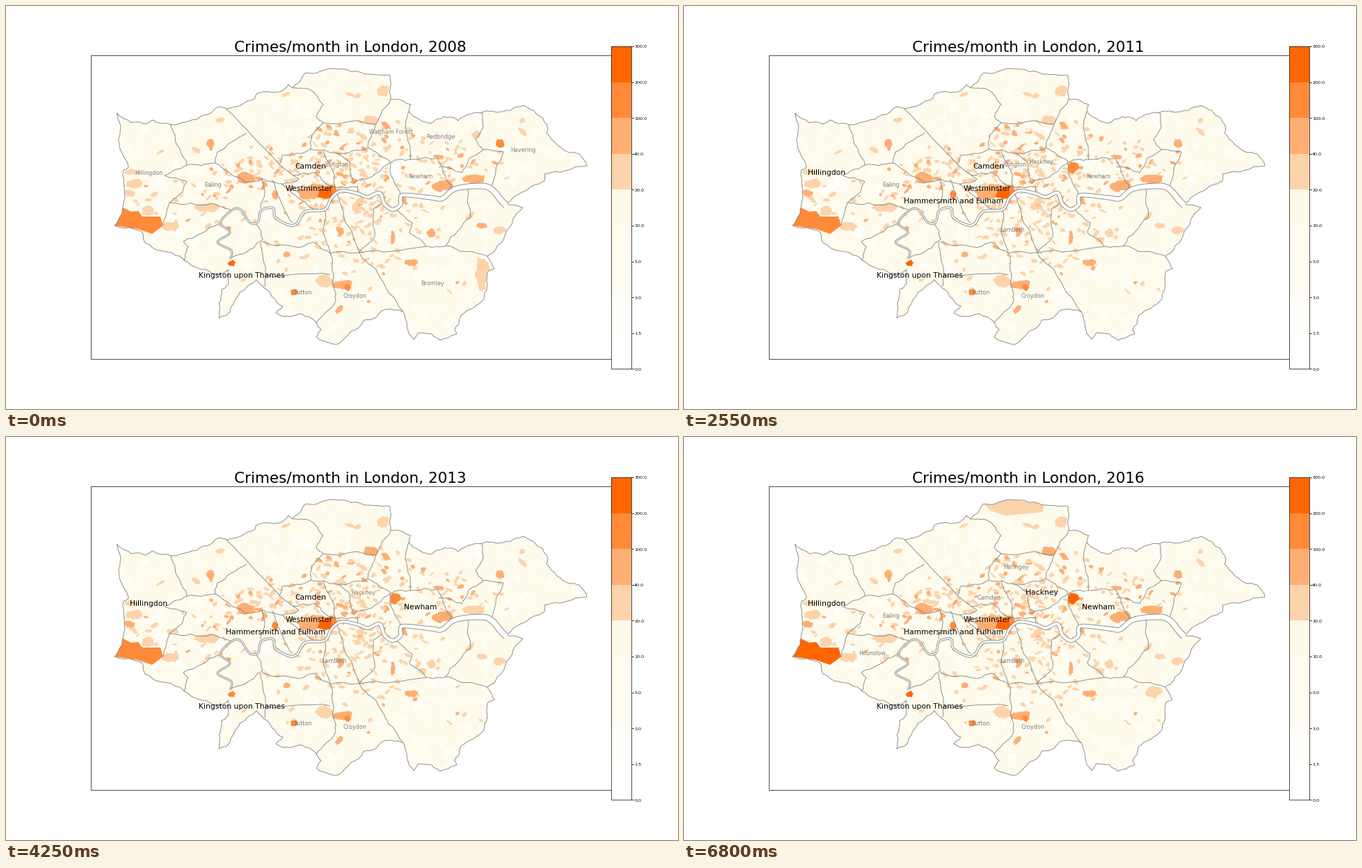
A matplotlib script that plays this animation: 966x580 px, repeating every 7.65 s.

```python
import numpy as np
import matplotlib.pyplot as plt
from matplotlib.animation import FuncAnimation
from matplotlib.collections import LineCollection, PolyCollection
from matplotlib.colors import to_rgba_array
from matplotlib.patches import Polygon, Rectangle

W, H, DPI = 966, 580, 64
PT = 72 / DPI
FIRST, COUNT = 2008, 9
GREY, DARK = "#808080", "#222222"
COLORS = ["#ffffff", "#fffefa", "#fffdf3", "#fffcef", "#fefaea",
          "#fdd3ab", "#feae73", "#ff8a39", "#ff6600"]
BOUNDS = [0, 1.5, 3, 5, 10, 20, 40, 100, 200, 300]
# white, peach, orange, red-orange, top class, pale
KEY = {"w": 0, "p": 5, "o": 6, "r": 7, "t": 8, "-": -1}
rng = np.random.default_rng(12)

NORTH_EDGE = [
    (160, 154), (180, 168), (200, 170), (210, 164), (237, 171), (262, 166),
    (306, 145), (317, 148), (358, 133), (360, 127), (390, 124), (406, 113),
    (412, 118), (431, 96), (470, 90), (522, 98), (552, 100), (553, 134),
    (582, 142), (579, 152), (608, 169), (630, 159), (650, 165), (676, 153),
    (706, 153), (743, 143), (772, 162)]
EAST_EDGE = [
    (779, 176), (777, 183), (800, 206), (824, 213), (835, 230), (774, 242),
    (774, 252), (745, 267), (718, 285), (743, 290), (728, 312), (699, 356),
    (692, 360), (702, 378), (693, 382), (691, 408), (687, 422), (654, 445),
    (645, 466), (648, 472), (624, 481), (612, 472), (593, 470), (586, 480)]
SOUTH_EDGE = [
    (571, 440), (544, 437), (532, 448), (514, 452), (502, 466), (475, 487),
    (446, 476), (453, 466), (446, 456), (424, 443), (396, 446), (388, 441),
    (398, 432), (376, 409), (360, 394), (336, 412), (322, 440), (306, 449),
    (310, 408), (320, 400), (320, 379), (306, 387), (286, 379), (256, 366)]
WEST_EDGE = [(250, 360), (200, 341), (196, 326), (156, 316), (168, 290),
             (169, 236), (176, 232), (163, 198), (163, 168)]

NORTH_LINES = [
    [(237, 171), (246, 200), (260, 229), (228, 244), (260, 253), (254, 268),
     (235, 283), (226, 316)],
    [(260, 229), (301, 226), (304, 210), (346, 183)],
    [(301, 226), (324, 243), (344, 254), (368, 249), (396, 256), (421, 249)],
    [(368, 249), (372, 268), (366, 291)],
    [(382, 250), (390, 272), (412, 312)],
    [(396, 256), (412, 270), (442, 292)],
    [(412, 118), (436, 120), (456, 142), (446, 160), (456, 168), (440, 185),
     (438, 206)],
    [(456, 168), (532, 170)],
    [(553, 134), (532, 170), (520, 204), (552, 224)],
    [(393, 228), (397, 215), (438, 206), (476, 212), (520, 204)]]
INNER_LINES = [
    [(412, 244), (444, 240), (456, 252), (474, 261), (506, 260), (506, 268)],
    [(456, 207), (468, 234), (474, 261)],
    [(476, 212), (494, 226), (500, 254)],
    [(500, 254), (534, 240), (552, 225), (582, 221), (620, 219)],
    [(552, 226), (556, 248), (568, 274)],
    [(579, 152), (576, 184), (582, 221)],
    [(620, 219), (640, 258), (638, 268)],
    [(622, 232), (655, 240), (666, 219), (686, 207), (715, 210), (702, 248),
     (697, 264)],
    [(683, 153), (686, 172), (675, 192), (686, 207)],
    [(235, 283), (296, 284), (328, 293)]]
SOUTH_LINES = [
    [(306, 313), (255, 339), (262, 346), (256, 366)],
    [(360, 313), (369, 336), (340, 357), (322, 362)],
    [(366, 340), (374, 388), (372, 404)],
    [(368, 339), (428, 346), (442, 340), (466, 356), (508, 355)],
    [(374, 387), (466, 387)],
    [(466, 356), (470, 402), (474, 424), (446, 456)],
    [(458, 293), (456, 328), (466, 356)],
    [(476, 268), (486, 306), (508, 355)],
    [(542, 284), (528, 292), (530, 332), (508, 355)],
    [(562, 294), (584, 312), (580, 326), (604, 346)],
    [(508, 355), (604, 346), (632, 345), (692, 360)],
    [(664, 262), (668, 304), (632, 345)],
    [(508, 355), (534, 384), (571, 440)]]
OLD_ROAD = [(317, 148), (393, 228), (421, 249)]
RIVER = [
    (322, 364), (324, 352), (304, 340), (322, 326), (308, 312), (326, 293),
    (338, 294), (350, 311), (362, 311), (367, 294), (384, 291), (387, 304),
    (406, 315), (418, 313), (430, 296), (458, 293), (468, 276), (482, 266),
    (506, 270), (520, 275), (537, 269), (544, 285), (556, 293), (567, 286),
    (567, 277), (573, 272), (612, 276), (627, 277), (646, 263), (680, 259),
    (697, 263), (712, 280), (719, 287)]
AIRPORT = [(168, 290), (180, 296), (190, 295), (196, 303), (222, 303),
           (226, 316), (210, 328), (190, 321), (156, 316), (160, 303)]
NORTH_STRIP = [(431, 96), (470, 90), (518, 96), (516, 108), (462, 113), (440, 106)]

# x, y, width, height, class for each year
NORTH_SPOTS = [
    (543, 123, 15, 16, "pppp-p-pp"), (525, 164, 19, 14, "ppoppoooo"),
    (294, 199, 9, 17, "o"), (346, 247, 25, 15, "o"), (289, 290, 36, 12, "p"),
    (237, 317, 24, 13, "p"), (184, 256, 26, 13, "p"), (181, 239, 20, 8, "p"),
    (178, 269, 15, 9, "pppoooooo"), (205, 336, 18, 11, "----p----"),
    (387, 272, 8, 13, "orrrrrrrr"), (204, 295, 17, 12, "p"),
    (437, 271, 36, 15, "o"), (450, 263, 28, 12, "o"), (468, 265, 14, 12, "r"),
    (459, 270, 22, 14, "t"), (559, 238, 18, 25, "www------"),
    (559, 232, 17, 14, "---rrrrrt"), (570, 278, 10, 12, "o")]
SOUTH_SPOTS = [
    (628, 258, 30, 17, "o"), (674, 249, 30, 15, "ooooppppo"),
    (677, 185, 13, 12, "ppp-p----"), (710, 198, 13, 11, "rrooooooo"),
    (684, 316, 14, 7, "ooppppppp"), (709, 323, 16, 10, "p"),
    (611, 327, 11, 13, "ooppppppp"), (598, 337, 13, 9, "--ppppppp"),
    (684, 384, 20, 40, "pp-------"), (681, 381, 34, 44, "------p--"),
    (674, 367, 22, 16, "-------pp"), (643, 360, 22, 17, "----p----"),
    (535, 413, 30, 14, "----p----"), (457, 395, 21, 19, "p"),
    (484, 401, 26, 13, "o"), (491, 405, 8, 8, "r"), (414, 412, 9, 9, "rrrrrrorr"),
    (325, 370, 10, 8, "ttttrrttt"), (445, 383, 30, 10, "--p------"),
    (583, 369, 18, 9, "o"), (556, 332, 6, 20, "o")]
PEACH = [(403, 127), (494, 127), (505, 129), (308, 164), (273, 207), (222, 210),
         (513, 188), (549, 205), (742, 180), (742, 165), (649, 203), (667, 303),
         (213, 271), (186, 281), (320, 253), (431, 361), (509, 352), (563, 352)]
ORANGE = [(543, 193), (546, 172), (381, 206), (320, 266), (320, 320), (448, 239),
          (480, 242), (499, 254), (622, 217), (480, 322), (649, 398), (404, 358),
          (479, 436), (475, 185)]
# centre, spread and number of the small scattered areas
CLUSTERS = [(460, 245, 50, 22, 95), (505, 298, 52, 22, 90), (550, 230, 48, 28, 75),
            (350, 236, 30, 14, 40), (262, 280, 45, 24, 38), (490, 185, 30, 16, 30),
            (640, 228, 32, 20, 28), (490, 350, 65, 25, 55), (480, 270, 190, 80, 36)]

# label place, then its rank by year: B high, g medium, "-" hidden
PLACES = {
    "Hillingdon": (205, 243, "gBBBBBBBB"), "Camden": (438, 233.5, "BBBBBBggg"),
    "Westminster": (435.5, 265.5, "BBBBBBBBB"),
    "Kingston upon Thames": (338.5, 391, "BBBBBBBBB"),
    "Waltham Forest": (553.5, 184.5, "ggg------"),
    "Redbridge": (625, 191, "gg-------"), "Havering": (743, 209.5, "ggg------"),
    "Islington": (475, 231, "gggg-----"), "Ealing": (298, 260, "gggg---gg"),
    "Newham": (595.5, 248, "g-ggBBBBB"), "Bromley": (613, 401.5, "g--------"),
    "Sutton": (427, 415, "gggggg-gg"), "Croydon": (501.5, 420.5, "ggggggggg"),
    "Hackney": (514, 227, "---gBggBB"),
    "Hammersmith and Fulham": (388, 284.5, "-gBBBBBBB"),
    "Lambeth": (472, 325, "---gggggg"), "Haringey": (477, 190, "--------g"),
    "Hounslow": (271, 313.5, "-------gg")}


def jag(pts, amp=0.11, depth=3):
    """Roughen a polyline by shifting its midpoints sideways."""
    pts = np.array(pts, float)
    for _ in range(depth):
        step = np.diff(pts, axis=0)
        size = np.hypot(*step.T)[:, None]
        shift = rng.uniform(-amp, amp, size.shape) * np.minimum(1, 25 / size)
        out = np.empty((2 * len(pts) - 1, 2))
        out[::2] = pts
        out[1::2] = pts[:-1] + step / 2 + step[:, ::-1] * [1, -1] * shift
        pts = out
    return pts


def blob(x, y, w, h, turn=0.0):
    n = 10
    a = (np.arange(n) + rng.uniform(-0.3, 0.3, n)) * 2 * np.pi / n
    r = rng.uniform(0.42, 0.68, n)
    px, py = r * w * np.cos(a), r * h * np.sin(a)
    c, s = np.cos(turn), np.sin(turn)
    return np.column_stack([x + px * c - py * s, y + px * s + py * c])


def small_blob(x, y, grow=1.0):
    return blob(x, y, grow * rng.uniform(4, 11), grow * rng.uniform(2.5, 6),
                rng.uniform(-0.9, 0.9))


def smooth(pts, n=8):
    p = np.array([pts[0], *pts, pts[-1]], float)
    t = np.linspace(0, 1, n, endpoint=False)[:, None]
    parts = [b + t * ((c - a) + t * ((2 * a - 5 * b + 4 * c - d)
             + t * (3 * b - a - 3 * c + d))) / 2
             for a, b, c, d in zip(p, p[1:], p[2:], p[3:])]
    return np.vstack(parts + [p[-1:]])


def classes(code):
    return [KEY[c] for c in (code * COUNT if len(code) == 1 else code)]


def add(collection):
    ax.add_collection(collection, autolim=False)
    return collection


fig = plt.figure(figsize=(W / DPI, H / DPI), dpi=DPI, facecolor="white")
ax = fig.add_axes([0, 0, 1, 1])
ax.set(xlim=(0, W), ylim=(H, 0))
ax.axis("off")

# land and pale texture
land = Polygon(jag(NORTH_EDGE + EAST_EDGE + SOUTH_EDGE + WEST_EDGE + NORTH_EDGE[:1]),
               fc="#fefbec", ec="none", zorder=1)
ax.add_patch(land)
pale = [blob(rng.uniform(155, 835), rng.uniform(90, 487), rng.uniform(5, 20),
             rng.uniform(4, 13), rng.uniform(0, 3)) for _ in range(1500)]
tints = rng.choice(COLORS[1:5], len(pale), p=[0.12, 0.3, 0.3, 0.28])
add(PolyCollection(pale, facecolors=tints, edgecolors="none",
                   zorder=2)).set_clip_path(land)

# coloured areas
shapes, levels = [], []
for cx, cy, sx, sy, count in CLUSTERS:
    for _ in range(count):
        shapes.append(small_blob(*rng.normal((cx, cy), (sx, sy))))
        level = 6 if rng.random() < 0.14 else 5
        levels.append(level - (rng.random(COUNT) < 0.13))
for points, code in ((PEACH, "p"), (ORANGE, "o")):
    for x, y in points:
        shapes.append(small_blob(x, y, 1.3))
        levels.append(classes(code))
for *box, code in NORTH_SPOTS + SOUTH_SPOTS:
    shapes.append(jag(blob(*box), 0.2, 1))
    levels.append(classes(code))
shapes += [np.array(AIRPORT), np.array(NORTH_STRIP)]
levels += [classes("rtrrrrtrt"), classes("--------p")]
levels = np.array(levels)
palette = np.vstack([to_rgba_array(COLORS), np.zeros((1, 4))])
areas = add(PolyCollection(shapes, edgecolors="none", zorder=3))
areas.set_clip_path(land)

# borders
borders = [jag(p) for p in NORTH_LINES + INNER_LINES + SOUTH_LINES]
borders += [jag(OLD_ROAD, 0.02), land.get_xy()]
add(LineCollection(borders, colors=GREY, linewidths=0.85 * PT, zorder=4))

# river
mid = smooth(RIVER)
flow = np.gradient(mid, axis=0)
normal = flow[:, ::-1] * [1, -1] / np.hypot(*flow.T)[:, None]
half = np.interp(mid[:, 0], [320, 460, 545, 600, 719], [1, 1.8, 2.6, 3, 4.5])[:, None]
banks = [mid + normal * half, mid - normal * half]
ax.add_patch(Polygon(np.vstack([banks[0], banks[1][::-1]]), fc="white", ec="none", zorder=5))
add(LineCollection(banks, colors=GREY, linewidths=0.85 * PT, zorder=6))

# frame and colour scale
ax.add_patch(Rectangle((121.5, 70.5), 748.5, 437, fc="none", ec=DARK,
                       lw=0.8 * PT, zorder=7))
left, top, wide, step = 870, 58, 28.5, 464.3 / 9
for i, color in enumerate(COLORS):
    ax.add_patch(Rectangle((left, top + (8 - i) * step), wide, step, fc=color,
                           ec="none", zorder=8))
ax.add_patch(Rectangle((left, top), wide, 9 * step, fc="none", ec=DARK,
                       lw=0.8 * PT, zorder=9))
for i, value in enumerate(BOUNDS):
    y = top + (9 - i) * step
    ax.plot([left + wide, left + wide + 3], [y, y], color="black", lw=0.75 * PT, zorder=9)
    ax.text(903.2, y + 2.4, f"{value:.1f}", size=6.4 * PT, family="DejaVu Sans", zorder=9)

title = ax.text(495, 66, "", size=21.47 * PT, family="DejaVu Sans", ha="center", zorder=10)
labels = [(ax.text(x, y, name, family="DejaVu Sans", ha="center", zorder=10), ranks)
          for name, (x, y, ranks) in PLACES.items()]


def update(i):
    title.set_text(f"Crimes/month in London, {FIRST + i}")
    areas.set_facecolor(palette[levels[:, i]])
    for label, ranks in labels:
        high = ranks[i] == "B"
        label.set_visible(ranks[i] != "-")
        label.set_color("black" if high else GREY)
        label.set_fontsize((10.74 if high else 8.05) * PT)
    return [title, areas]


anim = FuncAnimation(fig, update, frames=COUNT, interval=850, repeat=True,
                     repeat_delay=0, blit=False)
plt.show()
```
